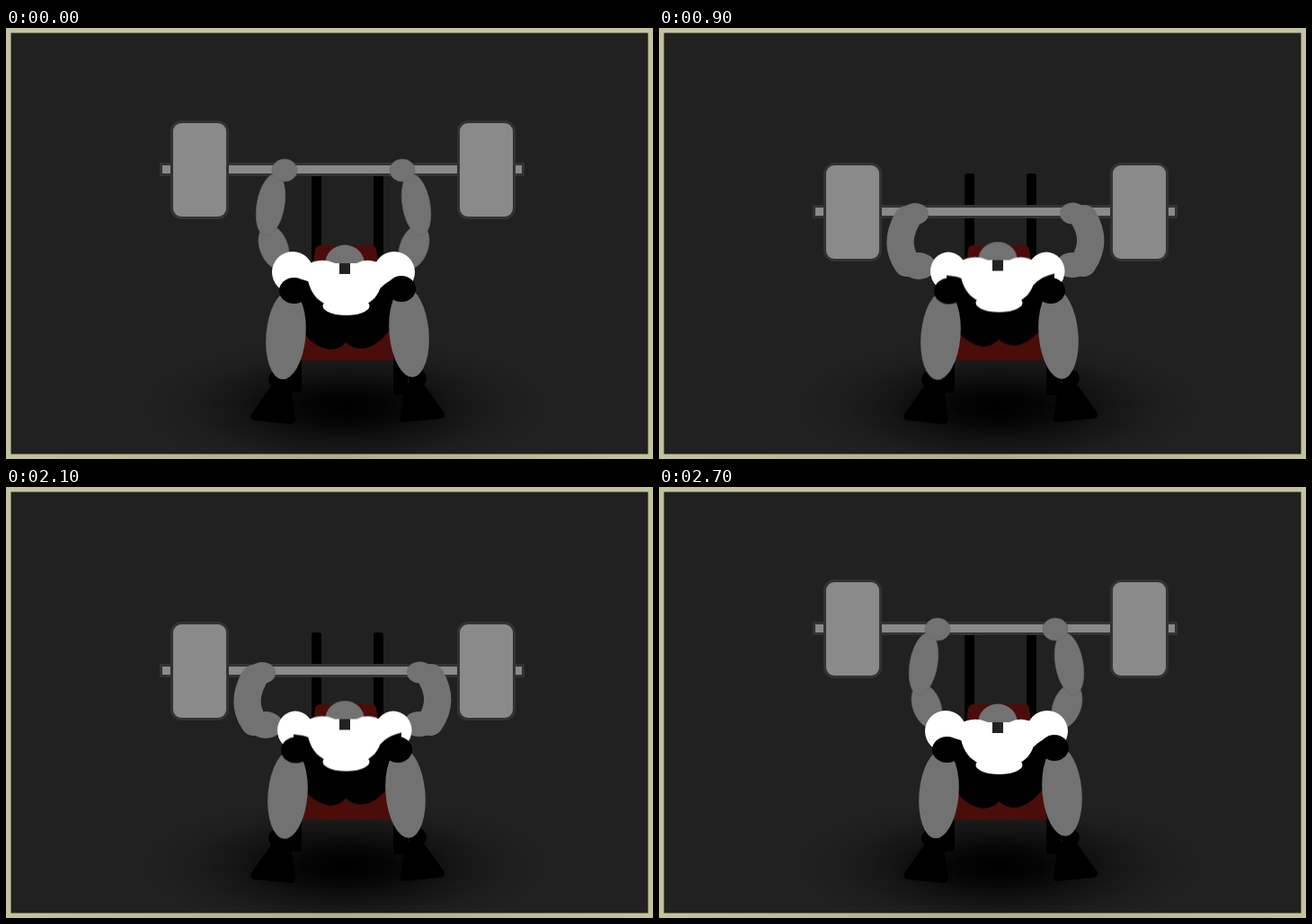
Recreate the animation shown at these times as an HTML page without scripts. Size 720x480 px, loop 3.2 s.

```html
<!DOCTYPE html>
<html lang="en">
<head>
<meta charset="utf-8">
<title>Bench press</title>
<style>
html, body { margin: 0; width: 100%; height: 100%; overflow: hidden; background: #212121; }
svg { display: block; width: 720px; height: 480px; }
.skin { fill: #727272; }
.arm path { fill: none; stroke: #727272; stroke-width: 30; stroke-linecap: round; }
.line ellipse { stroke: #676767; stroke-width: .7; }
.white { fill: #fff; stroke: none; }
.metal { fill: #8a8a8a; stroke: #333; stroke-width: 6; paint-order: stroke; }
.pose { visibility: hidden; }
.pose, .bar, .torso, .left, .right { animation: 3.2s step-end infinite; }

.top { animation-name: top; }
.high { animation-name: high; }
.mid { animation-name: mid; }
.low { animation-name: low; }
.chest { animation-name: chest; }
.bar { animation-name: bar; }
.torso { animation-name: torso; }
.left { animation-name: left; }
.right { animation-name: right; }

@keyframes top {
  0%, 84.375% { visibility: visible; }
  15.625% { visibility: hidden; }
  100% { visibility: visible; }
}
@keyframes high {
  0%, 21.875%, 84.375%, 100% { visibility: hidden; }
  15.625%, 78.125% { visibility: visible; }
}
@keyframes mid {
  0%, 28.125%, 78.125%, 100% { visibility: hidden; }
  21.875%, 71.875% { visibility: visible; }
}
@keyframes low {
  0%, 34.375%, 71.875%, 100% { visibility: hidden; }
  28.125%, 65.625% { visibility: visible; }
}
@keyframes chest {
  0%, 65.625%, 100% { visibility: hidden; }
  34.375% { visibility: visible; }
}
@keyframes bar {
  0%, 84.375%, 100% { transform: none; }
  15.625%, 78.125% { transform: translateY(16px); }
  21.875%, 71.875% { transform: translateY(32px); }
  28.125%, 65.625% { transform: translateY(47px); }
  34.375% { transform: translateY(61px); }
}
@keyframes torso {
  0%, 84.375%, 100% { transform: none; }
  15.625%, 78.125% { transform: translateY(-1px); }
  21.875%, 71.875% { transform: translateY(-2px); }
  28.125% { transform: translateY(-3.5px); }
  34.375% { transform: translateY(-3px); }
  65.625% { transform: translateY(-3.5px); }
}
@keyframes left {
  0%, 84.375%, 100% { transform: none; }
  15.625%, 78.125% { transform: translate(.5px, 0); }
  21.875%, 71.875% { transform: translate(2px, 1px); }
  28.125%, 65.625% { transform: translate(2px, .5px); }
  34.375% { transform: translate(3px, 1.5px); }
}
@keyframes right {
  0%, 84.375%, 100% { transform: none; }
  15.625%, 78.125% { transform: translate(-.5px, 0); }
  21.875%, 71.875% { transform: translate(-3px, 2px); }
  28.125%, 65.625% { transform: translate(-4px, 2px); }
  34.375% { transform: translate(-3.5px, 2px); }
}
</style>
</head>
<body>
<svg viewBox="0 0 720 480">
  <defs>
    <radialGradient id="shade">
      <stop offset="0" stop-color="#000"/>
      <stop offset=".2" stop-color="#000" stop-opacity=".88"/>
      <stop offset=".5" stop-color="#000" stop-opacity=".42"/>
      <stop offset=".75" stop-color="#000" stop-opacity=".12"/>
      <stop offset="1" stop-color="#000" stop-opacity="0"/>
    </radialGradient>
    <linearGradient id="edge">
      <stop offset="0" stop-color="#c4c39b"/>
      <stop offset=".5" stop-color="#b5ad8b"/>
      <stop offset="1" stop-color="#c4c39b"/>
    </linearGradient>
  </defs>

  <!-- room -->
  <rect width="720" height="480" fill="#c4c39b"/>
  <rect y="474" width="720" height="6" fill="url(#edge)"/>
  <rect x="5.5" y="5.5" width="709" height="469" fill="#212121"/>
  <ellipse cx="378" cy="422" rx="230" ry="78" fill="url(#shade)" clip-path="inset(0 0 26px 0)"/>

  <!-- bench -->
  <rect x="340" y="162" width="11" height="100" rx="3"/>
  <rect x="409" y="162" width="11" height="100" rx="3"/>
  <rect x="313" y="360" width="16" height="46" rx="3"/>
  <rect x="431" y="360" width="16" height="49" rx="3"/>
  <path d="M350 242H406Q411 242 412 247L432 370H328L344 247Q345 242 350 242Z" fill="#4b0d09"/>

  <g class="bar">
    <rect class="metal" x="174" y="153" width="400" height="9"/>
    <rect class="metal" x="186" y="106" width="59" height="104" rx="9"/>
    <rect class="metal" x="505" y="106" width="59" height="104" rx="9"/>
  </g>

  <!-- arms and shoulders -->
  <g class="pose arm skin line top">
    <ellipse cx="298" cy="244" rx="15.5" ry="25.5" transform="rotate(-20 298 244)"/>
    <ellipse cx="454" cy="244" rx="15.5" ry="25.5" transform="rotate(20 454 244)"/>
    <ellipse cx="294.5" cy="197" rx="15.3" ry="35" transform="rotate(10 294.5 197)"/>
    <ellipse cx="456.5" cy="197" rx="15.3" ry="35" transform="rotate(-10 456.5 197)"/>
    <ellipse cx="310" cy="158.500" rx="14" ry="12.500"/>
    <ellipse cx="441" cy="158.500" rx="14" ry="12.500"/>
    <circle class="white" cx="319" cy="272" r="23"/>
    <circle class="white" cx="432" cy="272" r="23"/>
  </g>
  <g class="pose arm skin line high">
    <ellipse cx="292" cy="251" rx="24" ry="15" transform="rotate(28 292 251)"/>
    <ellipse cx="459" cy="251" rx="22" ry="16" transform="rotate(-48 459 251)"/>
    <ellipse cx="277.500" cy="211" rx="15" ry="36" transform="rotate(12 277.500 211)"/>
    <ellipse cx="466" cy="208" rx="15" ry="35" transform="rotate(-12 466 208)"/>
    <ellipse cx="296" cy="174.500" rx="15" ry="12.500"/>
    <ellipse cx="447" cy="172.500" rx="14.500" ry="12.500"/>
    <ellipse class="white" cx="319" cy="271" rx="21.500" ry="23"/>
    <ellipse class="white" cx="433" cy="271" rx="22" ry="22"/>
  </g>
  <g class="pose arm skin mid">
    <path d="M283 206Q268 228 281 250"/>
    <path d="M466 208Q482 228 468 250"/>
    <ellipse cx="295" cy="260.500" rx="20" ry="14.500"/>
    <ellipse cx="458" cy="262" rx="20" ry="15"/>
    <g class="line">
      <ellipse cx="291" cy="189" rx="14.500" ry="12"/>
      <ellipse cx="455" cy="191" rx="14" ry="12"/>
    </g>
    <ellipse class="white" cx="322" cy="271.500" rx="20" ry="21.500"/>
    <ellipse class="white" cx="431" cy="271.500" rx="21" ry="21.500"/>
  </g>
  <g class="pose arm skin low">
    <path d="M276 213Q261 240 276 262"/>
    <path d="M473 212Q488 238 472 262"/>
    <ellipse cx="289" cy="265" rx="19" ry="15"/>
    <ellipse cx="460" cy="264" rx="18" ry="14"/>
    <ellipse cx="285" cy="207" rx="15" ry="12"/>
    <ellipse cx="460.500" cy="206.500" rx="14.500" ry="12"/>
    <ellipse class="white" cx="322" cy="271" rx="20" ry="21.500"/>
    <ellipse class="white" cx="431" cy="271" rx="20.500" ry="21.500"/>
  </g>
  <g class="pose arm skin chest">
    <path d="M281 224Q261 245 280 267"/>
    <path d="M465 224Q486 245 468 268"/>
    <ellipse cx="293" cy="268" rx="17" ry="15"/>
    <ellipse cx="456" cy="269" rx="16" ry="14"/>
    <ellipse cx="292" cy="221.500" rx="18" ry="12" transform="rotate(15 292 221.500)"/>
    <ellipse cx="452" cy="221" rx="17.500" ry="12" transform="rotate(-15 452 221)"/>
    <ellipse class="white" cx="322" cy="271" rx="20" ry="21.500"/>
    <ellipse class="white" cx="430" cy="271" rx="20" ry="21.500"/>
  </g>

  <!-- shoes -->
  <circle cx="302" cy="391" r="10"/>
  <circle cx="458" cy="390" r="10"/>
  <path d="M297 396L316 393L322 436Q321 441 316 441L276 437Q271 436 273 430Z"/>
  <path d="M445 396L463 394L488 429Q489 434 484 435L442 439Q437 438 439 432Z"/>

  <g class="torso">
    <ellipse class="skin" cx="377" cy="263" rx="22" ry="21.500"/>
    <path d="M320 279Q333 280 338 283L345 302H411Q415 283 440 277V300L428 335Q412 357 394 357Q384 356 378 350Q372 358 360 358Q344 356 333 342L320 300Z"/>
    <path class="white" d="M333 265Q349 254 366 262H390Q405 254 420 265L418 285Q413 304 397 309H360Q343 304 337 285Z"/>
    <ellipse class="white" cx="378.500" cy="309.500" rx="26" ry="10.500"/>
    <rect x="371" y="262" width="12" height="12" fill="#222"/>
  </g>

  <!-- legs -->
  <g class="left">
    <ellipse class="skin" cx="311.500" cy="342" rx="22" ry="49.500" transform="rotate(5 311.500 342)"/>
    <ellipse cx="320.500" cy="292.500" rx="16.500" ry="14.500"/>
  </g>
  <g class="right">
    <ellipse class="skin" cx="448.500" cy="339" rx="22" ry="50" transform="rotate(-5 448.500 339)"/>
    <ellipse cx="440" cy="290.500" rx="16" ry="14.500"/>
  </g>
</svg>
</body>
</html>
```
